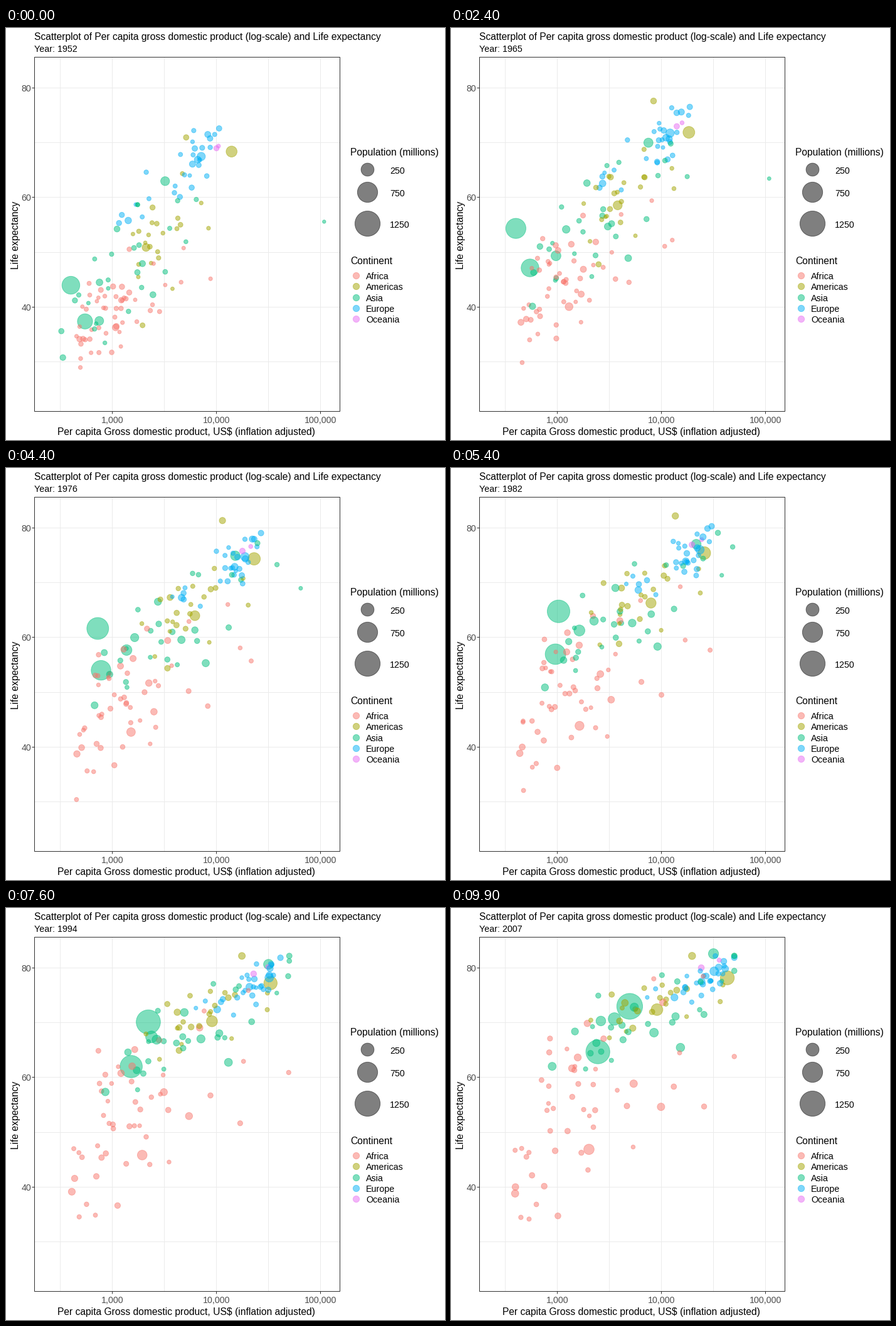
Animation of 700 by 656 pixels, one loop 10 s. Source, as a matplotlib script:

```python
import numpy as np
import matplotlib.pyplot as plt
from matplotlib.animation import FuncAnimation
from matplotlib.patches import Rectangle

W, H, DPI = 700, 656, 64
PT = 72 / DPI  # points per pixel
FRAMES, INTERVAL = 100, 100
FIRST, LAST = 1952, 2007
YEARS = np.arange(FIRST, LAST + 1, 5)
U = np.linspace(0, 1, len(YEARS))
RISE = 1 - (1 - U) ** 1.6  # fast gains first, then levelling off

COLORS = {
    "Africa": "#F8766D",
    "Americas": "#A3A500",
    "Asia": "#00BF7D",
    "Europe": "#00B0F6",
    "Oceania": "#E76BF3",
}

# Bubbles that stand out: continent, then (start, end) of population,
# income and life expectancy, and the years in which income moves
LANDMARKS = [
    ("Asia", (556, 1318), (400, 4959), (44, 73), (1967, 2007)),
    ("Asia", (372, 1110), (547, 2452), (37.4, 64.7), (1967, 2007)),
    ("Americas", (158, 301), (13990, 42952), (68.4, 78.2), (1952, 2007)),
    ("Asia", (82, 224), (750, 3541), (37.5, 70.7), (1957, 2007)),
    ("Asia", (86, 127), (3217, 31656), (63, 82.6), (1952, 1988)),
    ("Americas", (57, 190), (2109, 9066), (50.9, 72.4), (1952, 1985)),
    ("Africa", (33, 135), (1077, 2014), (36.3, 46.9), (1952, 1997)),
    ("Europe", (69, 82), (7144, 32170), (67.5, 79.4), (1952, 1990)),
    ("Asia", (0.2, 2.5), (108382, 38000), (55.6, 77.6), (1971, 1982)),
]

# All others: count, (start, end) of typical population, log income, its
# spread, life expectancy, its spread; income-life correlation, income skew
CROWDS = {
    "Africa": (51, (3, 9), (3.02, 3.24), (.27, .45), (39, 54.8), (4.8, 9), .6, .2),
    "Americas": (23, (3, 9), (3.47, 3.92), (.2, .26), (53, 73.6), (8.8, 3.8), .7, 0),
    "Asia": (28, (6, 20), (3.1, 3.85), (.35, .47), (46, 70.8), (8.4, 6.2), .75, .1),
    "Europe": (29, (7, 9), (3.66, 4.37), (.26, .22), (65, 77.8), (5, 2.6), .85, -.2),
    "Oceania": (2, (5, 9), (4.01, 4.47), (.01, .06), (69.2, 80.7), (.2, .5), 1, 0),
}

rng = np.random.default_rng(7)


def px_x(log_income):
    return 169.5 + 166 * (log_income - 3)


def px_y(life):
    return 95.5 + 8.725 * (80 - life)


def diameter(pop):
    return 5.0 + 36.2 * np.sqrt(np.asarray(pop) / 1318)


def blend(pair, u):
    return pair[0] + (pair[1] - pair[0]) * u


def track(log_income, life, pop):
    return px_x(log_income), px_y(life), diameter(blend(pop, U))


def scores(n):
    z = np.clip(rng.normal(size=n), -1.8, 1.8)
    return ((z - z.mean()) / z.std())[:, None]


def drift(n):
    return scores(n) * np.cos(0.7 * U) + scores(n) * np.sin(0.7 * U)


def crowd(n, pop, income, income_sd, life, life_sd, corr, skew):
    a, b = drift(n), drift(n)
    jitter = rng.normal(0, 0.08, (2, n, len(U)))
    x = a + skew * (a ** 2 - 1) + jitter[0]
    y = corr * a + np.sqrt(1 - corr ** 2) * b + jitter[1]
    x = np.minimum(blend(income, RISE) + blend(income_sd, U) * x, 4.7)
    y = np.clip(blend(life, RISE) + blend(life_sd, U) * y, 29, 82.2)
    size = np.exp(0.9 * scores(n))
    return [track(*row) for row in zip(x, y, np.array(pop) * size)]


def build():
    tracks, hues = [], []
    for name, pop, income, life, boom in LANDMARKS:
        moved = np.clip((YEARS - boom[0]) / (boom[1] - boom[0]), 0, 1)
        tracks.append(track(blend(np.log10(income), moved), blend(life, RISE), pop))
        hues.append(COLORS[name])
    rest = [(t, COLORS[name]) for name, spec in CROWDS.items() for t in crowd(*spec)]
    for i in rng.permutation(len(rest)):
        tracks.append(rest[i][0])
        hues.append(rest[i][1])
    return np.array(tracks), hues


plt.rcParams["font.family"] = "Liberation Sans"
fig = plt.figure(figsize=(W / DPI, H / DPI), dpi=DPI, facecolor="white")
ax = fig.add_axes([0, 0, 1, 1])
ax.set(xlim=(0, W), ylim=(H, 0))
ax.axis("off")


def label(x, y, text, size=14.2, color="black", **kw):
    return ax.text(x, y, text, fontsize=size * PT, color=color, va="baseline", **kw)


def line(xs, ys, color):
    ax.plot(xs, ys, color=color, lw=PT, zorder=1, solid_capstyle="butt", snap=False)


def bubbles(x, y, d, color):
    dots = ax.scatter(x, y, s=(np.asarray(d) * PT) ** 2, c=color, alpha=0.5,
                      linewidths=0.9 * PT, zorder=3)
    dots.set_edgecolor(dots.get_facecolor())
    return dots


L, T, R, B = 45.5, 46.5, 532.5, 610.5
for k in range(6):
    gx, gy = 86.5 + 83 * k, 95.5 + round(87.25 * k)
    line((gx, gx), (T, B), "#EBEBEB")
    line((L, R), (gy, gy), "#EBEBEB")
ax.add_patch(Rectangle((L, T), R - L, B - T, fill=False, ec="#333333", lw=PT,
                       zorder=4, snap=False))

for k, text in enumerate(("1,000", "10,000", "100,000")):
    gx = 169.5 + 166 * k
    line((gx, gx), (B, B + 4), "#333333")
    label(gx, 629, text, color="#4D4D4D", ha="center")
for k, text in enumerate(("80", "60", "40")):
    gy = 95.5 + round(174.5 * k)
    line((L - 4, L), (gy, gy), "#333333")
    label(40, gy + 5.5, text, color="#4D4D4D", ha="right")

BIG = 15.65
label(45, 19, "Scatterplot of Per capita gross domestic product (log-scale)"
      " and Life expectancy", BIG)
label(287.5, 648, "Per capita Gross domestic product, US$ (inflation adjusted)",
      BIG, ha="center")
label(20, 329.5, "Life expectancy", BIG, ha="center", rotation=90,
      rotation_mode="anchor")
year_text = label(45, 38, "Year: 1952")

label(549, 203, "Population (millions)", BIG)
for pop, y in ((250, 225), (750, 261), (1250, 311)):
    bubbles([576], [y], [diameter(pop)], "black")
    label(612, y + 7, str(pop))
label(549, 376, "Continent", BIG)
for k, (name, color) in enumerate(COLORS.items()):
    y = 394 + 17.3 * k
    bubbles([557.7], [y], [10.3], color)
    label(574, y + 6, name)

tracks, hues = build()
dots = bubbles(tracks[:, 0, 0], tracks[:, 1, 0], tracks[:, 2, 0], hues)


def update(i):
    pos = i * (len(YEARS) - 1) / (FRAMES - 1)
    k = min(int(pos), len(YEARS) - 2)
    now = blend((tracks[:, :, k], tracks[:, :, k + 1]), pos - k)
    dots.set_offsets(now[:, :2])
    dots.set_sizes((now[:, 2] * PT) ** 2)
    year = blend((FIRST, LAST), i / (FRAMES - 1))
    year_text.set_text(f"Year: {round(year)}")
    return dots, year_text


anim = FuncAnimation(fig, update, frames=FRAMES, interval=INTERVAL, repeat=True,
                     repeat_delay=0)
plt.show()
```
